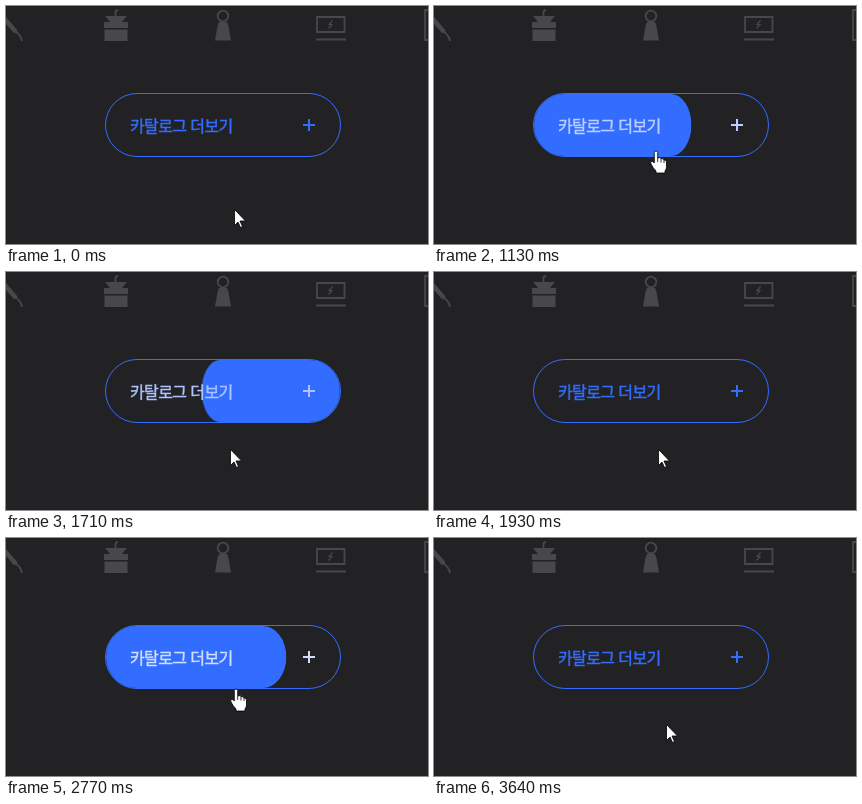
Recreate the animation shown at these times as an HTML page. Size 422 by 238 pixels, loop 3.98 s.

```html
<!DOCTYPE html>
<html lang="ko">
<head>
<meta charset="utf-8">
<title>카탈로그</title>
<style>
  html, body { margin: 0; width: 100%; height: 100%; overflow: hidden; background: #222224; }
  .stage { position: relative; width: 422px; height: 238px; overflow: hidden; }
  svg { position: absolute; left: 0; top: 0; overflow: visible; }
  .icons { fill: #48484a; stroke: #48484a; stroke-width: 0; }
  .icons .line { fill: none; stroke-width: 1.8; }
  .button {
    position: absolute; left: 99px; top: 87px; width: 236px; height: 64px;
    box-sizing: border-box; border: 1px solid #336dff; border-radius: 32px;
    overflow: hidden; color: #336dff;
  }
  .fill {
    position: absolute; inset: 0; border-radius: 32px;
    background: #336dff; transform: scaleX(0); transform-origin: 0 50%;
  }
  .label {
    position: absolute; left: 24px; top: 0; white-space: nowrap;
    font: 500 16px/63px "Noto Sans CJK KR", "Noto Sans CJK", "Noto Sans KR", sans-serif;
    letter-spacing: -.038em; -webkit-text-stroke: .4px currentColor;
  }
  .plus::before, .plus::after { content: ""; position: absolute; background: currentColor; }
  .plus::before { left: 197px; top: 30px; width: 12px; height: 2px; }
  .plus::after { left: 202px; top: 25px; width: 2px; height: 12px; }
  .cursor path { fill: #fff; stroke: #000; stroke-width: .8; stroke-linejoin: round; }
</style>
</head>
<body>
<div class="stage">
  <svg class="icons" width="422" height="238">
    <g id="pen">
      <path class="line" style="stroke-width:4.5" d="M-3 11L10 26"/>
      <path class="line" d="M9 25Q15 29 16 35"/>
    </g>
    <g id="grinder">
      <path d="M99 10H121L116 16H122V22H98V16H104ZM98.500 23.500H121.500V35H98.500Z"/>
      <path class="line" d="M109.500 10V6Q109.500 4 112 4"/>
    </g>
    <g id="weight">
      <circle class="line" cx="217" cy="10" r="5.3"/>
      <path d="M213 16H221L222.500 20 225 34.500H209L211.500 20Z"/>
    </g>
    <g id="laptop">
      <path class="line" d="M311 11H338.500V26H311ZM310 33.500H340"/>
      <path class="line" style="stroke-width:1.2" d="M326.500 14.500L323 18.500H326L322.500 22.500"/>
    </g>
    <path class="line" d="M424 4H419V34H424"/>
  </svg>

  <div class="button">
    <div class="fill"></div>
    <span class="label">카탈로그 더보기</span>
    <span class="plus"></span>
  </div>

  <svg class="cursor" width="1" height="1">
    <path class="arrow" d="M.5 .5V16.500L4 13 6.500 18.500 8.500 17.500 6 12H11.500Z"/>
    <path class="hand" d="M-1.700 12V1.500Q-1.700 0 0 0T1.700 1.500V7Q4.500 5.800 5 7.800 7.500 7 8 9 10.500 8.600 10.500 11V16Q10.500 18 9 20V22H0V20Q-3 17-5 13-6 10.500-4 10.200-3 10.300-1.700 12ZM1.700 7V11M5 8V11.500M8 9V12"/>
  </svg>
</div>
<script>
  const LOOP = 3980, FADE = 300;
  const BLUE = '#336dff', WHITE = '#fff';
  const hovers = [[1013, 1636], [2630, 3340]];
  const start = document.timeline.currentTime ?? 0;

  const key = (time, props, easing = 'linear') => ({ offset: time / LOOP, easing, ...props });

  function play(selector, frames) {
    const timing = { duration: LOOP, iterations: Infinity };
    document.querySelector(selector).animate(frames, timing).startTime = start;
  }

  // Wraps the keys of each hover in a loop that begins and ends at rest.
  const perHover = (rest, keys, easing) => [
    key(0, rest, easing), ...hovers.flatMap(([enter, leave]) => keys(enter, leave)), key(LOOP, rest)
  ];

  // Eases from idle to active on enter and on to done on leave.
  const fade = (idle, active, done = idle) => perHover(idle, (enter, leave) => [
    key(enter, idle, 'ease'), key(enter + FADE, active),
    key(leave, active, 'ease'), key(leave + FADE, done), key(leave + FADE, idle)
  ]);

  const toggle = (idle, over) => perHover({ opacity: idle }, (enter, leave) => [
    key(enter, { opacity: over }, 'step-end'), key(leave, { opacity: idle }, 'step-end')
  ], 'step-end');

  const bar = (shift, scale) => ({ transform: `translateX(${shift}) scaleX(${scale})` });
  const at = (x, y) => ({ transform: `translate(${x}px, ${y}px)` });

  // Pointer: rests, with a quick eased move between them.
  const home = at(228, 203), onFirst = at(222, 145), off = at(224, 177), onSecond = at(230, 151), end = at(232, 186);
  const move = (from, to, t0, t1, easing) => [key(t0, from, easing), key(t1, to)];

  play('.fill', fade(bar('0%', 0), bar('0%', 1), bar('100%', 0)));
  play('.button', fade({ color: BLUE }, { color: WHITE }));
  play('.arrow', toggle(1, 0));
  play('.hand', toggle(0, 1));
  play('.cursor', [
    key(0, home),
    ...move(home, onFirst, 855, 1130, 'cubic-bezier(.15, .4, .3, 1)'),
    ...move(onFirst, off, 1600, 1715, 'ease-in-out'),
    ...move(off, onSecond, 2550, 2720, 'ease-out'),
    ...move(onSecond, end, 3295, 3480, 'ease-in-out'),
    key(LOOP, end)
  ]);
</script>
</body>
</html>
```
